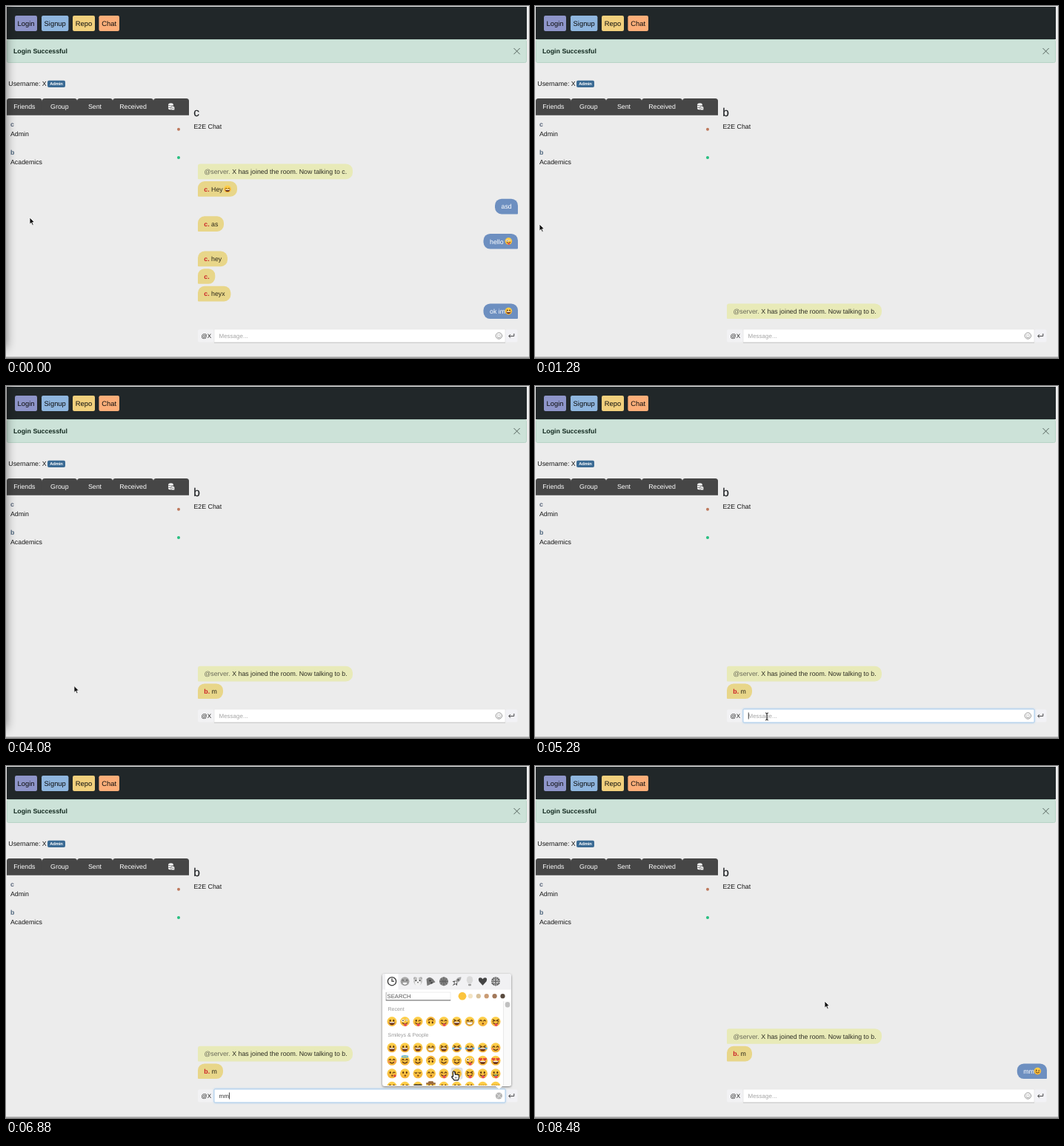
Write an HTML page that moves like this. It is 706 by 476 pixels and loops after 8.64 s.

```html
<!DOCTYPE html>
<html lang="en">
<head>
<meta charset="utf-8">
<title>Chat demo</title>
<style>
html, body { margin: 0; width: 100%; height: 100%; overflow: hidden; background: #ececec; }
svg { display: block; width: 706px; height: 476px; text-rendering: geometricPrecision;
  font: 8.8px "Liberation Sans", Arial, sans-serif; }
.line { fill: none; stroke: #55300f; stroke-width: 1.8; stroke-linecap: round; }
</style>
</head>
<body>
<svg viewBox="0 0 706 476">
  <defs>
    <filter id="blur" x="-100%" width="300%"><feGaussianBlur stdDeviation="7"/></filter>
    <filter id="soft"><feGaussianBlur stdDeviation="1.5"/></filter>
    <clipPath id="list"><rect x="508" y="320" width="163" height="112"/></clipPath>
    <linearGradient id="skin" x2="0" y2="1"><stop stop-color="#fed24c"/><stop offset="1" stop-color="#f5b136"/></linearGradient>
  </defs>
  <g id="page"></g>
  <g id="scene"></g>
</svg>
<script>
const LOOP = 8640, STEP = 80;
const $ = id => document.getElementById(id);

const text = (x, y, s, fill = '#161616', more = '') =>
  `<text x="${x}" y="${y}" fill="${fill}" ${more}>${s}</text>`;
const rect = (x, y, w, h, fill, r = 0, more = '') =>
  `<rect x="${x}" y="${y}" width="${w}" height="${h}" rx="${r}" fill="${fill}" ${more}/>`;
const dot = (x, y, r, fill, more = '') => `<circle cx="${x}" cy="${y}" r="${r}" fill="${fill}" ${more}/>`;
const path = (d, fill, more = '') => `<path d="${d}" fill="${fill}" ${more}/>`;
const stroke = (d, color, w = 1) => path(d, 'none', `stroke="${color}" stroke-width="${w}"`);
const at = (x, y, s, scale = 1) => `<g transform="translate(${x} ${y}) scale(${scale})">${s}</g>`;
const bold = 'font-weight="bold"', middle = 'text-anchor="middle"';

// Emoji: first letter picks the eyes, second the mouth, third an extra.
const line = d => `<path class="line" d="${d}"/>`;
const eye = x => `<ellipse cx="${x}" cy="-2" rx="1.6" ry="2.4" fill="#55300f"/>`;
const heart = x => path(`M${x} 1l-3.6-3.4q-1-3 1.6-3.2q1.4 0 2 1.4q.6-1.4 2-1.4q2.6.2 1.6 3.2z`, '#e0453c');
const EYES = {
  d: eye(-3.6) + eye(3.6),
  a: line('M-6-1q2-4 4 0M2-1q2-4 4 0'),
  l: line('M-6-2q2 3 4 0M2-2q2 3 4 0'),
  w: eye(-3.6) + line('M2-1q2-3 4-1'),
  x: line('M-6-4l4 2l-4 2M6-4l-4 2l4 2'),
  z: dot(-4, -2, 3, '#fff') + dot(-4, -2, 1.4, '#55300f') + dot(4, -3, 2.2, '#fff') + dot(4, -3, 1, '#55300f'),
  s: heart(-4.6) + heart(4.6)
};
EYES.u = EYES.d;
const smile = line('M-5 3q5 5 10 0');
const MOUTHS = {
  O: path('M-6.5 1h13a6.5 6.5 0 0 1-13 0z', '#6b3014') + rect(-5.3, 1, 10.6, 2, '#fff'),
  G: path('M-6.5 1h13q0 6-6.5 6t-6.5-6z', '#fff', 'stroke="#8a5a22"'),
  S: smile,
  T: smile + path('M-2 4.8h6v2.4a3 3 0 0 1-6 0z', '#e8505b'),
  K: dot(0.5, 4.5, 1.8, '#7a3d16')
};
const EXTRAS = {
  b: dot(-7.5, 2, 2.3, '#55aef0') + dot(7.5, 2, 2.3, '#55aef0'),
  c: dot(-6.5, 2.5, 2.2, '#f5905c') + dot(6.5, 2.5, 2.2, '#f5905c'),
  h: '<ellipse cy="-8.5" rx="6.5" ry="2" fill="none" stroke="#58b5e6" stroke-width="2"/>',
  r: dot(6, 5, 2.8, '#e0453c'),
  g: rect(-8.5, -4.5, 17, 5, '#333', 2),
  t: rect(-10, -8, 20, 3.5, '#9a6a3c', 1) + rect(-5.5, -11, 11, 5, '#9a6a3c', 2),
  m: rect(-3, 2, 6, 3, '#6aa56a')
};
const face = (code, x, y, r = 6.4) => at(x, y,
  `<g${code[0] === 'u' ? ' transform="rotate(180)"' : ''}>` +
  dot(0, 0, 10.2, 'url(#skin)') +
  EYES[code[0]] + MOUTHS[code[1]] + (EXTRAS[code[2]] || '') + '</g>', r / 10);
const faceRow = (codes, y) => codes.split(' ').map((c, i) => face(c, 521 + 17.5 * i, y)).join('');

function rounded(x, y, w, h, [a, b, c, d]) {
  return `M${x + a} ${y}h${w - a - b}a${b} ${b} 0 0 1 ${b} ${b}v${h - b - c}a${c} ${c} 0 0 1 ${-c} ${c}` +
    `h${c + d - w}a${d} ${d} 0 0 1 ${-d} ${-d}v${a + d - h}a${a} ${a} 0 0 1 ${a} ${-a}z`;
}

function buildPage() {
  const buttons = [['Login', 12, 30, '#8e95c9'], ['Signup', 48, 36.4, '#8fb6de'],
    ['Repo', 90, 30, '#f2d07d'], ['Chat', 125.4, 27.6, '#fcae79']];
  const tabs = [['Friends', 1, 47.7], ['Group', 48.7, 47.3], ['Sent', 96, 48], ['Received', 144, 55], ['', 199, 48]];
  return rect(0, 0, 706, 476, '#ececec') +
    rect(1, 1, 702, 44, '#212729') +
    buttons.map(([s, x, w, c]) => rect(x, 13, w, 21, c, 2.2) +
      text(x + w / 2, 27, s, '#0c0c0c', `font-size="9.4" ${middle}`)).join('') +
    rect(1.5, 45.5, 701, 31, '#cce2d8', 2, 'stroke="#b7d4c6"') +
    text(10, 64.3, 'Login Successful', '#12291f', bold) +
    stroke('M685.5 57l8.2 8.2M693.7 57l-8.2 8.2', '#55635d', 1) +
    text(3.3, 108.4, 'Username: X') + rect(56, 100.7, 24, 9.4, '#3b6b94', 2) +
    text(68, 107.3, 'Admin', '#fff', `font-size="5.7" ${bold} ${middle}`) +
    rect(1, 128.5, 246, 19, '#464646') +
    tabs.map(([s, x, w]) => path(rounded(x, 125, w, 22.5, [3.5, 3.5, 0, 0]), '#464646') +
      text(x + w / 2, 139.3, s, '#fff', middle)).join('') +
    rect(219, 131.6, 7, 8.6, '#fff', 2.5) + stroke('M219 134.3q3.5 1.5 7 0M219 137q3.5 1.5 7 0', '#464646', .7) +
    rect(223, 136, 4.6, 4.8, '#fff', 1, 'stroke="#464646" stroke-width=".6"') + dot(225.3, 138.4, .7, '#464646') +
    text(6, 163.2, 'c', '#566379', bold) + text(6, 176, 'Admin') + dot(233, 166.7, 2, '#bf785c') +
    text(6, 201.4, 'b', '#50687f', bold) + text(6, 214.2, 'Academics') + dot(233, 205, 2, '#26bf80') +
    text(253.5, 166.4, 'E2E Chat') +
    rect(0, 474.6, 706, 1, '#747474');
}

// Bubbles stack upwards: row 0 is the newest message.
const rowTop = row => 402.4 - 23.62 * row;
const bubble = (row, x, right, fill, corners, body) =>
  path(rounded(x, rowTop(row), right - x, 20.7, corners), fill) + at(0, rowTop(row), body);
const server = (row, who) => bubble(row, 259, 468, '#e8eab8', [3, 9, 9, 1],
  text(267.4, 13.7, `<tspan fill="#686858">@server.</tspan> X has joined the room. Now talking to ${who}.`, '#2b2b22'));
const received = (row, right, who, s, emoji) => bubble(row, 259, right, '#e8d689', [9, 9, 9, 1],
  text(267.3, 13.7, `<tspan fill="#cb2027" ${bold}>${who}.</tspan> ${s}`, '#2b2718') +
  (emoji ? face(emoji, 299, 10.4, 4.8) : ''));
const sent = (row, x, s, emoji) => bubble(row, x, 691, '#6d8fc0', [9, 9, 1, 9],
  text(x + 8.5, 13.7, s, '#fff') + (emoji ? face(emoji, 678.4, 10.2, 4.7) : ''));

function chat(t) {
  if (t < 800) return server(8, 'c') + received(7, 312, 'c', 'Hey', 'aO') + sent(6, 660, 'asd') +
    received(5, 294, 'c', 'as') + sent(4, 644.5, 'hello', 'zT') + received(3, 299, 'c', 'hey') +
    received(2, 282.3, 'c', '') + received(1, 303.4, 'c', 'heyx') + sent(0, 644.5, 'ok im', 'dO');
  if (t < 3600) return server(0, 'b');
  if (t < 8160) return server(1, 'b') + received(0, 293, 'b', 'm');
  return server(2, 'b') + received(1, 293, 'b', 'm') + sent(0, 650.8, 'mm', 'wS');
}

function inputBar(t, focused, open, picked) {
  const typed = t < 5680 || t >= 8160 ? '' : t < 5840 ? 'm' : 'mm';
  const caretX = 287.8 + 6.66 * typed.length;
  let s = rect(259, 437.6, 22, 16.8, '#f2f2f4', 2) + text(263.6, 449.2, '@X', '#222', 'font-size="8.1"') +
    rect(674, 437.6, 16.5, 16.8, '#f2f2f6', 2) +
    stroke('M685.8 443v3.4h-7M681 444.2l-2.3 2.2l2.3 2.2', '#333', .9);
  if (focused) s += rect(280.5, 436.2, 394, 19.6, '#b9d5f0', 2, 'filter="url(#soft)"');
  s += rect(281, 437, 393, 18, '#fff', 1, `stroke="${focused ? '#9dc3e8' : '#e6e6e6'}" stroke-width=".8"`);
  if (!focused) s += rect(281, 454.8, 393, .9, '#c4c4c4');
  s += typed ? text(287.5, 448.5, typed, '#333', 'font-size="8"')
    : text(287.5, 448.5, 'Message...', '#a5a5a5', 'font-size="8"');
  if (picked) s += face('wS', 307.5, 446, 5.2);
  else if (focused) s += rect(caretX, 441.5, .8, 9, '#222');
  if (picked) s += stroke('M663 443.6l4.6 4.6M667.6 443.6l-4.6 4.6', '#858585', 1.8);
  else if (open) s += dot(665.4, 446, 4.6, '#b5b5b5') + stroke('M662 443l7 6M668 442.6l-5 7', '#e6e6e6', .9);
  else s += dot(665.4, 446, 4.2, 'none', 'stroke="#8c8c8c" stroke-width=".9"') +
    dot(664, 445, .7, '#8c8c8c') + dot(666.8, 445, .7, '#8c8c8c') +
    stroke('M663 447.3q2.4 2.6 4.8 0', '#8c8c8c', .9);
  return s;
}

const TAB_ICONS = [
  dot(0, 0, 5.6, '#fff', 'stroke="#333" stroke-width="1.3"') + stroke('M0-4v4h3', '#333', 1.2),
  dot(0, 0, 6, '#a8a8a8') + stroke('M-4-1q1.2-2 2.4 0M1.6-1q1.2-2 2.4 0', '#333') + path('M-4 1h8q-1 4-4 4t-4-4z', '#fff', 'stroke="#555" stroke-width=".6"'),
  dot(-4, -4, 2, '#aaa') + dot(4, -4, 2, '#aaa') + dot(0, 0, 5.8, '#c4c4c4') + dot(0, 2, 4, '#f2f2f2') + path('M-1-6h2v6h-2z', '#f2f2f2') +
    dot(-2.6, -1, .9, '#333') + dot(2.6, -1, .9, '#333') + dot(0, 1.4, .9, '#666'),
  path('M-6-3q4-5 9 0l3 4l-11 5z', '#777') + dot(-1, -1, 1.3, '#444') + dot(1, 2, 1.2, '#444'),
  dot(0, 0, 6, '#858585') + stroke('M-6 0h12M0-6v12M-4-4q4 4 0 8M4-4q-4 4 0 8', '#555', .8),
  path('M6-6q-6 0-8 6l2 2q6-2 6-8z', '#a5a5a5') + path('M-2-1l-4 1l3 2zM1 2l-1 4l-2-3zM-3 2l-3 4l4-2z', '#555') + dot(2, -2, 1.2, '#555'),
  path('M-2 3q-3-4-2-6a4 4 0 0 1 8 0q1 2-2 6z', '#dadada') + rect(-2, 3.5, 4, 2.6, '#999', 1),
  path('M0 5.5L-5 0q-2-5 2-5q2 0 3 2q1-2 3-2q4 0 2 5z', '#444'),
  dot(0, 0, 6, '#555') + stroke('M-4-4l8 8M4-4l-8 8', '#ddd', .9) + stroke('M-6 0h12M0-6v12', '#eee', 3) + stroke('M-6 0h12M0-6v12', '#666', 1.6)
];
const TONES = ['#fbc43d', '#f3e3c2', '#d9c29b', '#ca9b74', '#a2785a', '#594a3e'];

function picker(picked, hover) {
  const search = rect(513, 306, 87, 11, '#fff', 0, 'stroke="#e6e6e6" stroke-width=".7"') +
    (picked ? rect(512.8, 306.5, .9, 10, '#333') : rect(512.8, 306, .7, 11, '#999') + rect(512.8, 316.4, 87.4, .9, '#555'));
  const recent = (picked ? 'wS ' : '') + 'dO zT wT uS aT xO aG aK' + (picked ? '' : ' xT');
  return rect(508, 282, 174, 152, '#777', 3, 'filter="url(#soft)"') +
    rect(508, 281, 174, 152, '#fff', 3) + path('M661 433h9l-4.5 4z', '#fff') +
    path(rounded(508, 281, 174, 21.5, [3, 3, 0, 0]), '#f1f1f3') +
    rect(512, 281, 17.5, 21.5, '#fff') +
    TAB_ICONS.map((icon, i) => at(521 + 17.5 * i, 291.2, icon)).join('') +
    search + text(514.6, 314, 'SEARCH', '#555', 'font-size="7.7"') +
    TONES.map((c, i) => dot(616 + 10.9 * i, 311.2, i ? 3.1 : 5.4, c)).join('') +
    text(515.5, 331, 'Recent', '#999', 'font-size="7"') +
    text(515.5, 366, 'Smileys &amp; People', '#999', 'font-size="7"') +
    rect(671.5, 318, 10.5, 114, '#fafafa') + rect(671.2, 318, .6, 114, '#ddd') + rect(673.8, 319, 6.4, 7.4, '#c0c0c0', 3.2) +
    '<g clip-path="url(#list)">' +
    (hover ? rect(hover[0] - 8, hover[1] - 8, 16, 16, '#e2e2e2', 3) : '') +
    faceRow(recent, 345.5) +
    faceRow('dO dO aO aG xO xOb aOb xOb aSc', 380.8) +
    faceRow('aSc aSh dS uS wS lS zT sO sO', 398.3) +
    faceRow('wKr dK lK aK aT wT xT dT dTm', 415.8) +
    faceRow('aO wS dSg dOt dS wS dS lS lS', 433.3) + '</g>';
}

// Pointer stops: time, x, y.
const STOPS = [[0, 32, 286], [560, 10, 198], [720, 10, 198], [1280, 6, 295], [1600, -14, 300],
  [3760, -14, 420], [4480, 240, 385], [4800, 240, 385], [5200, 313, 447], [5840, 313, 447],
  [6320, 664, 445], [6480, 664, 445], [6880, 605, 413], [7040, 605, 413], [7200, 591, 397],
  [7360, 591, 397], [7920, 680.5, 447], [8080, 680.5, 447], [8480, 391, 318], [LOOP, 391, 318]];

function pointerAt(t) {
  const i = STOPS.findIndex(s => s[0] > t);
  const [t0, x0, y0] = STOPS[i - 1], [t1, x1, y1] = STOPS[i];
  const u = (t - t0) / (t1 - t0), k = u * u * (3 - 2 * u);
  return [x0 + (x1 - x0) * k, y0 + (y1 - y0) * k];
}

const edge = 'stroke="#fff" stroke-width=".8" stroke-linejoin="round"';
const ARROW = path('M0 0v9.2l2.1-2l1.5 3.4l1.6-.7l-1.5-3.3h2.8z', '#111', edge);
const BEAM = stroke('M-2-5q2 0 2 1.5q0-1.5 2-1.5M0-4v8M-2 5q2 0 2-1.5q0 1.5 2 1.5', '#222', 1);
const HAND = at(-.4, -.2, path('M-1.2.8q1.2-1.6 2.2 0l.6 3.4q1-.9 1.8 0q1-.6 1.6.3q1.2-.4 1.3.9q.3 3-1 5.8h-5q-1.3-2-3-4q0-1.4 1.8-.6z',
  '#fff', 'stroke="#111" stroke-width="1" stroke-linejoin="round"') + stroke('M1.8 7v2M3.4 7v2', '#111', .6), 1.08);

function scene(t) {
  const open = t >= 6400 && t < 8160, picked = t >= 7200 && t < 8160;
  const focused = t >= 5200 && t < 8160;
  const unfocusedWindow = t < 480 || (t >= 1760 && t < 4320);
  const [x, y] = pointerAt(t);
  const overInput = y > 437 && x > 281 && x < 656;
  const overFaces = open && x > 508 && x < 671 && y > 372 && y < 432;
  const overButton = y > 437 && x >= 656;
  const snap = (v, from, gap) => from + gap * Math.round((v - from) / gap);
  const hover = overFaces && [snap(x + 2, 521, 17.5), snap(y + 2, 380.8, 17.5)];
  const typing = t >= 5680 && t < 5840;
  return text(253.3, 149, t < 800 ? 'c' : 'b', '#1c1f22', 'font-size="15.4" stroke="#1c1f22" stroke-width=".15"') +
    chat(t) + inputBar(t, focused, open, picked) + (open ? picker(picked, hover) : '') +
    (unfocusedWindow ? rect(-60, -20, 60, 484, '#000', 6, 'opacity=".5" filter="url(#blur)"') : '') +
    (typing ? '' : at(x, y, overInput ? BEAM : overFaces || overButton ? HAND : ARROW));
}

$('page').innerHTML = buildPage();
let shown = -1;
function tick() {
  const t = Math.floor(performance.now() % LOOP / STEP) * STEP;
  if (t !== shown) $('scene').innerHTML = scene(shown = t);
  requestAnimationFrame(tick);
}
tick();
</script>
</body>
</html>
```
